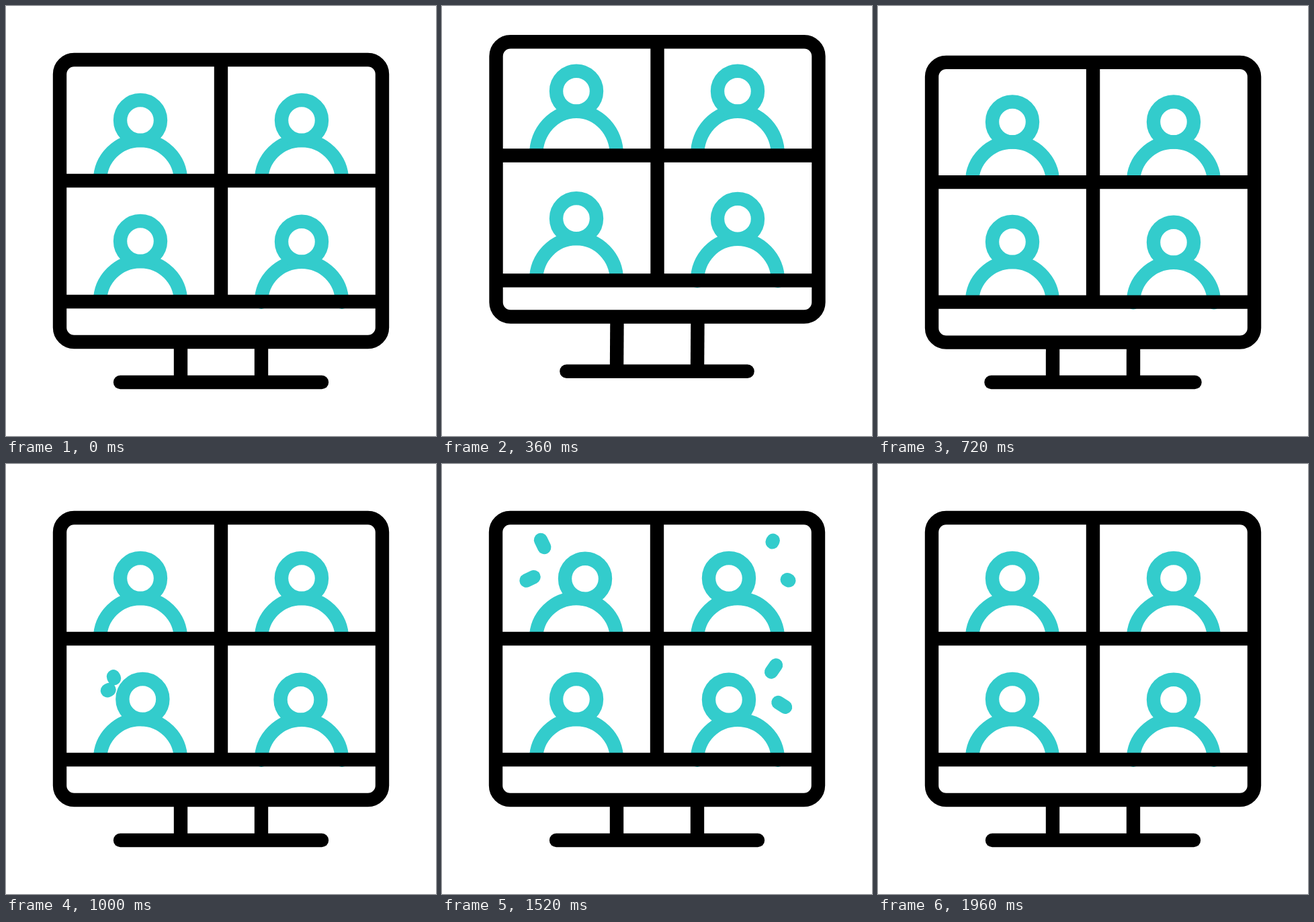
An HTML page with a canvas that plays this animation: 640x640 px, repeating every 2 s.

```html
<!DOCTYPE html>
<html lang="en">
<head>
<meta charset="utf-8">
<title>Video call</title>
<style>
  html, body { margin: 0; width: 100%; height: 100%; overflow: hidden; background: #fff; }
  canvas { display: block; width: 100vw; height: 100vh; }
</style>
</head>
<body>
<canvas id="stage" width="640" height="640"></canvas>
<script>
const ctx = document.getElementById('stage').getContext('2d');
const LOOP = 2000, STEP = 40;
const BLACK = '#000', TEAL = '#33cccc';

// Hop: rest, stretched in the air, squashed on landing, rest
const HOP = [80, 320, 560, 760];

// Offsets from rest as [in the air, on landing]
const POSE = {
  top: [-31.8, 36.8],
  mid: [-42.1, 20.3],
  bar: [-34.5, 6],
  bottom: [-41, 6.2],
  base: [-17.6, 0],
  spread: [-17.8, 14.9],
  upperHead: [-48.7, 24.2],
  lowerHead: [-37.3, 9.5],
  shift: [0.5, 0.6]
};

// dx: how far the head leans, out and back: lean times; burst: when the dashes start
const PEOPLE = [
  { x: 200, y: 170, dx: 13, dy: 0.7, out: 1240, back: 1720, burst: 1160,
    dashes: [[160, 140, 147, 113], [152.5, 160.5, 125.5, 173.5]] },
  { x: 440, y: 170, dx: -13, dy: 0, out: 1060, back: 1720, burst: 1080,
    dashes: [[481, 141, 492.7, 113.8], [489, 161.2, 516.3, 173.3]] },
  { x: 200, y: 350, dx: 13, dy: 0, out: 920, back: 1180, burst: 940,
    dashes: [[161, 319, 149, 290], [153.5, 336, 125.5, 349]] },
  { x: 440, y: 350.7, dx: -13, dy: 0, out: 950, back: 1720, burst: 1160, roundFeet: true,
    dashes: [[480, 324, 497, 299.5], [485, 345, 511, 361.8]] }
];
const LEAN = 240, TRIM = 320, TRIM_LAG = 180;

const mix = (a, b, k) => a + (b - a) * k;

function ease(t, start, length) {
  const k = Math.min(1, Math.max(0, (t - start) / length));
  return k * k * (3 - 2 * k);
}

function hop([air, land], t) {
  const [up, peak, ground, end] = HOP;
  if (t < peak) return air * ease(t, up, peak - up);
  if (t < ground) return mix(air, land, ease(t, peak, ground - peak));
  return land * (1 - ease(t, ground, end - ground));
}

function pen(color, cap) {
  ctx.strokeStyle = color;
  ctx.lineCap = cap;
  ctx.lineWidth = 20.4;
}

function line(x1, y1, x2, y2) {
  ctx.beginPath();
  ctx.moveTo(x1, y1);
  ctx.lineTo(x2, y2);
  ctx.stroke();
}

function drawPerson(p, t, rise, floor) {
  const lean = ease(t, p.out, LEAN) - ease(t, p.back, LEAN);
  const headY = p.y + rise;
  const feet = floor + (p.roundFeet ? 0.7 : 0);

  pen(TEAL, p.roundFeet ? 'round' : 'butt');
  ctx.beginPath();
  ctx.ellipse(p.x, feet, 60, feet - headY - 30, 0, Math.PI, 2 * Math.PI);
  ctx.stroke();
  ctx.beginPath();
  ctx.arc(p.x + p.dx * lean, headY + p.dy * lean, 30, 0, 2 * Math.PI);
  ctx.stroke();

  const head = ease(t, p.burst, TRIM);
  const tail = ease(t, p.burst + TRIM_LAG, TRIM);
  if (head - tail < 0.002) return;
  pen(TEAL, 'round');
  for (const [x1, y1, x2, y2] of p.dashes) {
    line(mix(x1, x2, tail), mix(y1, y2, tail), mix(x1, x2, head), mix(y1, y2, head));
  }
}

function drawMonitor(top, mid, bar, bottom, base, spread, shift) {
  pen(BLACK, 'butt');
  for (const x of [260, 380]) line(x + shift, bottom, x, base);
  line(80 + shift, mid, 560 + shift, mid);
  line(80 + shift, bar, 560 + shift, bar);
  line(320 + shift, top, 320 + shift, bar);
  ctx.beginPath();
  ctx.roundRect(80 + shift, top, 480, bottom - top, 21.5);
  ctx.stroke();
  pen(BLACK, 'round');
  line(170 - spread, base, 470 + spread, base);
}

function draw(t) {
  const at = name => hop(POSE[name], t);
  const mid = 260 + at('mid'), bar = 440 + at('bar');

  ctx.fillStyle = '#fff';
  ctx.fillRect(0, 0, 640, 640);
  PEOPLE.forEach((p, i) => {
    const upper = i < 2;
    drawPerson(p, t, at(upper ? 'upperHead' : 'lowerHead'), upper ? mid : bar);
  });
  drawMonitor(80 + at('top'), mid, bar, 500 + at('bottom'),
    560 + at('base'), at('spread'), at('shift'));
}

const start = performance.now();
function tick() {
  // Small allowance for late display frames
  const t = performance.now() - start + 8;
  draw(Math.floor(t / STEP) * STEP % LOOP);
  requestAnimationFrame(tick);
}
tick();
</script>
</body>
</html>
```
